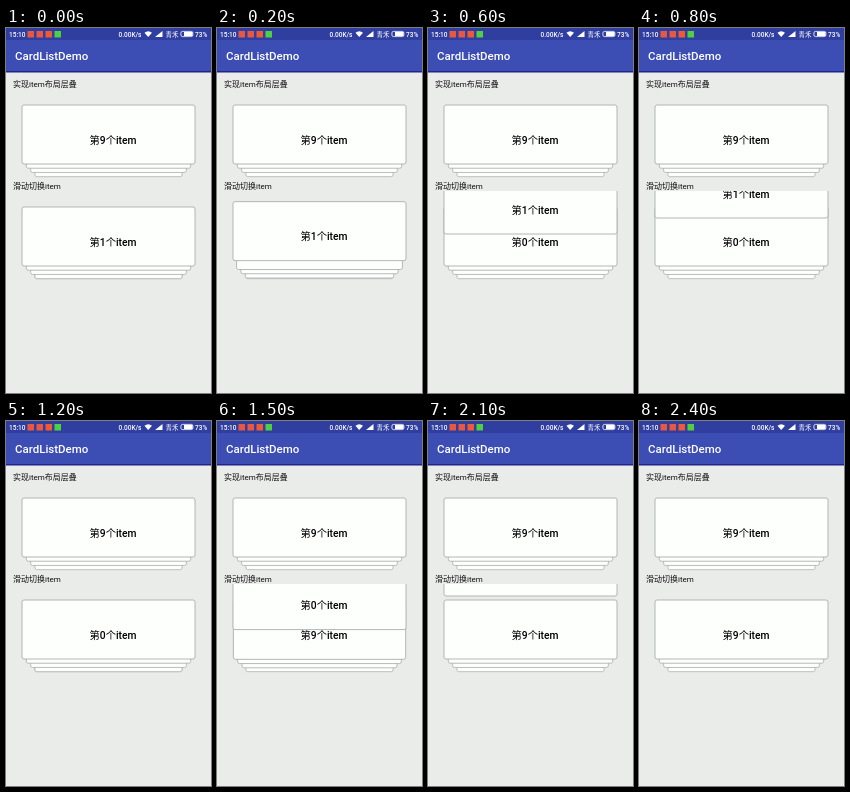
Write an HTML page that moves like this. It is 205x365 px and loops after 2500 ms.

```html
<!DOCTYPE html>
<html lang="zh-CN">
<head>
<meta charset="utf-8">
<style>
  html, body { margin: 0; width: 100%; height: 100%; overflow: hidden; background: #eaecea; }
  svg { display: block; font-family: Roboto, "Noto Sans CJK SC", "Noto Sans CJK", sans-serif; }
  .label { font-size: 8px; fill: #111; }
  .title { font-size: 11.5px; font-weight: 500; fill: #fff; }
  .status { font-size: 6.5px; font-weight: 500; fill: #fff; }
  .card rect { fill: #fdfffd; stroke: #a9afac; stroke-width: .9; }
  .card text { font-size: 10.3px; font-weight: 500; fill: #000; text-anchor: middle; }
</style>
</head>
<body>
<svg width="205" height="365" viewBox="0 0 205 365">
  <defs><clipPath id="list"><rect y="163" width="205" height="202"/></clipPath></defs>
  <rect width="205" height="365" fill="#eaecea"/>
  <rect width="205" height="43" fill="#3c4db4"/>
  <rect y="43" width="205" height="1.5" fill="#20248c"/>
  <rect width="205" height="12" fill="#303f9f"/>

  <g class="status">
    <text x="3" y="8.5">15:10</text>
    <rect x="21.5" y="3" width="6.5" height="6.5" fill="#e8573f"/>
    <rect x="30.5" y="3" width="6.5" height="6.5" fill="#e8573f"/>
    <rect x="39.5" y="3" width="6.5" height="6.5" fill="#ef5a35"/>
    <rect x="48.5" y="3" width="6.5" height="6.5" fill="#4fcf42"/>
    <text x="112.5" y="8.5">0.00K/s</text>
    <path d="M138.5 4.8Q142.2 1.8 146 4.8L142.2 9Z"/>
    <path d="M149 9L156.5 3V9Z"/>
    <text x="159.5" y="8.5">青禾</text>
    <rect x="174.9" y="3.4" width="12" height="5.2" rx="1.6" fill="none" stroke="#fff" stroke-width=".8"/>
    <rect x="178" y="4" width="8.5" height="4"/>
    <text x="189" y="8.5">73%</text>
  </g>
  <text class="title" x="9" y="32">CardListDemo</text>

  <text class="label" x="7" y="59">实现item布局层叠</text>
  <g id="fixed"></g>
  <text class="label" x="7" y="161">滑动切换item</text>
  <g clip-path="url(#list)"><g id="swipe" transform="translate(0 102)"></g></g>
</svg>
<script>
const LOOP = 2500, STEP = 100, MAX_DEPTH = 3;
const CX = 102.5, CY = 106.5;

// Each swipe: its time/offset keys and the item numbers from the top card down
const swipes = [
  { keys: [[0, 0], [100, 0], [400, 16], [800, 48], [1100, 76]], items: [1, 0, 9, 8, 7] },
  { keys: [[1200, 0], [1700, 49], [2100, 63], [2400, 78]], items: [0, 9, 8, 7, 6] }
];

function makeStack(id, items) {
  const stack = document.getElementById(id);
  stack.innerHTML = items.map(n => `<g class="card">
    <rect x="-86.5" y="-29.5" width="173" height="59" rx="2"/>
    <text x="4.5" y="9">第${n}个item</text></g>`).reverse().join('');
  return [...stack.children].reverse();
}

function place(card, depth, lift = 0) {
  const y = CY + 5.7 * depth - lift;
  card.setAttribute('transform', `translate(${CX} ${y}) scale(${1 - 0.05 * depth})`);
}

function valueAt(keys, t) {
  for (let i = 1; i < keys.length; i++) {
    const [t0, a] = keys[i - 1], [t1, b] = keys[i];
    if (t <= t1) return a + (b - a) * (t - t0) / (t1 - t0);
  }
  return keys[keys.length - 1][1];
}

makeStack('fixed', [9, 8, 7, 6]).forEach((card, i) => place(card, i));
const cards = makeStack('swipe', swipes[0].items);

function draw(now) {
  const t = Math.floor(now % LOOP / STEP) * STEP;
  const { keys, items } = swipes[t < 1200 ? 0 : 1];
  const lift = valueAt(keys, t);
  const progress = Math.min(1, lift / 32);
  cards.forEach((card, i) => {
    card.lastElementChild.textContent = `第${items[i]}个item`;
    if (i === 0) place(card, 0, lift);
    else place(card, Math.min(MAX_DEPTH, i - progress));
  });
}

const start = performance.now();
function tick() {
  draw(performance.now() - start);
  requestAnimationFrame(tick);
}
tick();
</script>
</body>
</html>
```
